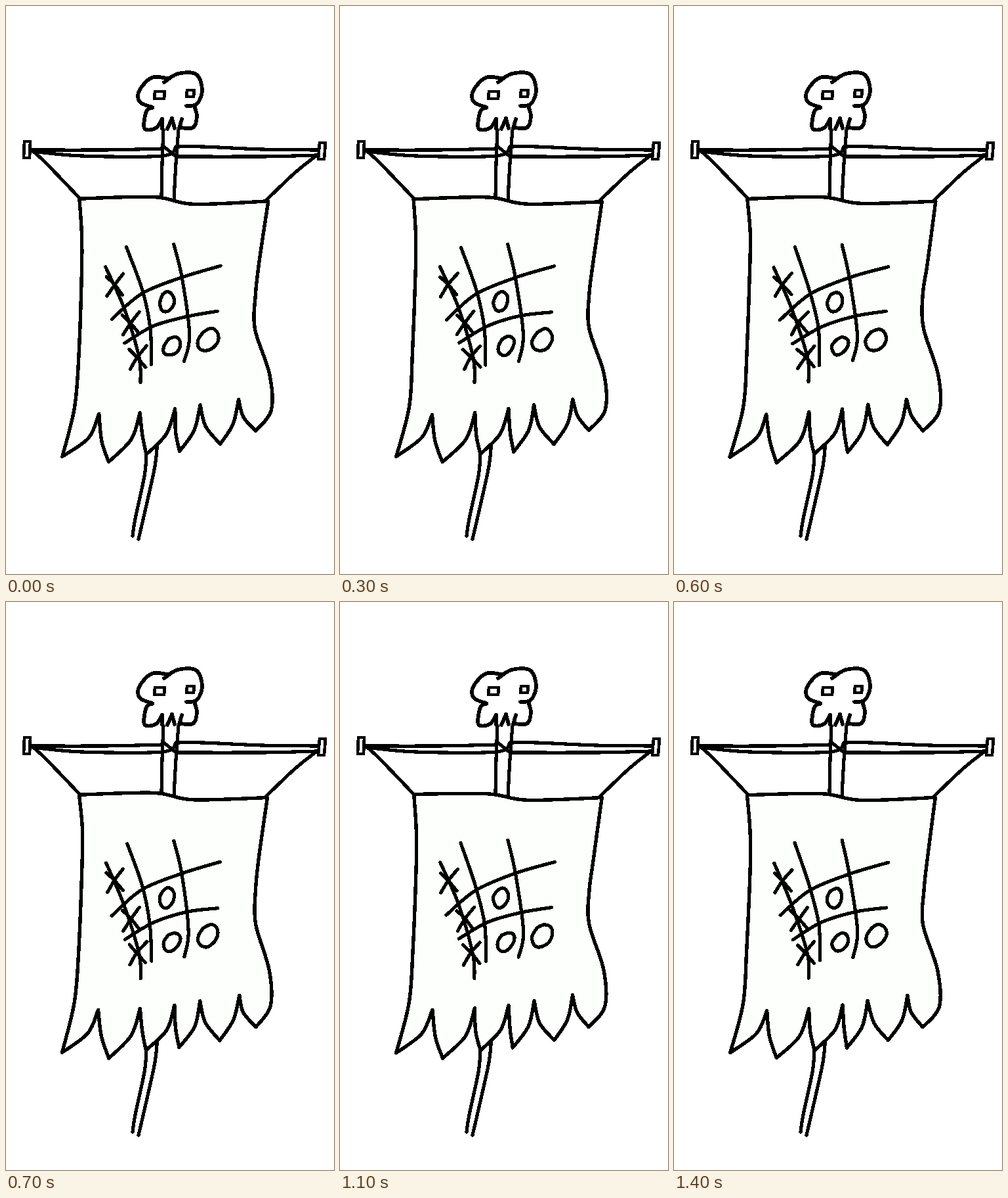
Write an HTML page that moves like this. It is 500 px wide and 864 px high and loops after 1500 ms.

```html
<!DOCTYPE html>
<html lang="en">
<head>
<meta charset="utf-8">
<title>Tattered banner</title>
<style>
  html, body { margin: 0; width: 100%; height: 100%; overflow: hidden; background: #fff; }
  svg { display: block; width: 100vw; height: 100vh; }
  path { fill: none; stroke: #000; stroke-linecap: round; stroke-linejoin: round; shape-rendering: crispEdges; }
</style>
</head>
<body>
<svg id="stage" viewBox="0 0 500 864"></svg>
<script>
const STEP = 100, STEPS = 15, WOBBLE = 0.9;
const stage = document.getElementById('stage');

// A curve is a list of points it passes through.
const curve = text => text.split(' ').map(p => p.split(',').map(Number));
const curves = (...texts) => texts.map(curve);

function box(x, y, w, h, lean) {
  const c = [[x + lean, y], [x + w + lean, y], [x + w, y + h], [x, y + h]];
  return c.map((p, i) => [p, c[(i + 1) % 4]]);
}

function ring(x, y, rx, ry, lean) {
  return Array.from({ length: 9 }, (_, i) => {
    const a = (i % 8 - 3) * Math.PI / 4;
    return [x + rx * Math.cos(a) - lean * Math.sin(a), y + ry * Math.sin(a)];
  });
}

const cross = (x, y) => [
  [[x + 14, y - 17], [x, y], [x - 11, y + 18]],
  [[x - 12, y - 12], [x, y], [x + 13, y + 15]]
];

// Each side of a tooth drops steeply from the notch, then swings to the tip.
const side = ([nx, ny], [tx, ty]) =>
  [[nx, ny], [nx + 0.28 * (tx - nx), ny + 0.55 * (ty - ny)], [tx, ty]];

function hem(tips, notches) {
  return notches.flatMap((n, i) => [side(n, tips[i]).reverse(), side(n, tips[i + 1])]);
}

const skull = curves(
  '241,116 262,103 290,104 299,128 291,149 275,152',
  '246,110 222,109 203,129 204,146 223,154',
  '223,155 214,160 211,186 228,186 238,172',
  '287,152 291,168 285,185 266,185',
  '238,172 238,186', '253,171 246,187', '253,171 257,186', '268,172 264,186'
);
const boxes = [box(226, 130, 15, 11, 1), box(275, 128, 11, 10, 1),
  box(27, 206, 9, 25, 1), box(476, 208, 9, 25, 2)].flat();
const pole = curves(
  '40,219 150,219 239,217', '40,221 115,228 238,228 259,214', '242,215 259,229',
  '259,214 300,214 390,218 474,219', '259,229 390,229 474,227',
  '39,219 60,238 112,292', '474,227 440,254 395,297',
  '240,188 238,240 237,292', '263,188 259,240 256,295',
  '214,682 211,715 197,780 193,806', '231,662 227,700 215,755 202,811'
);
const cloth = [
  curve('112,293 225,291 285,301 399,297'),
  curve('399,297 386,390 380,440 380,490 402,560 404,615 380,646'),
  ...hem(curve('380,646 326,667 264,678 214,682 157,694 85,686'),
         curve('355,598 296,607 257,613 205,618 141,621')),
  curve('85,686 105,610 111,530 116,400 116,345 112,293')
];
const game = [
  ...curves(
    '184,367 207,432 220,490 222,546', '256,363 268,414 279,500 272,540',
    '162,477 207,438 268,413 327,396', '181,513 225,487 275,472 323,465',
    '152,397 180,460 203,535 205,572'),
  ...cross(165, 424), ...cross(190, 482), ...cross(200, 534),
  ring(245, 450, 11, 15, 2), ring(253, 517, 12, 14, 4), ring(308, 508, 15, 17, 4)
];

// Signed noise in -1..1; a shared corner always moves as one point.
function noise(x, y, k) {
  const n = Math.sin(Math.round(x) * 12.9898 + Math.round(y) * 78.233 + k * 37.719) * 43758.5453;
  return (n - Math.floor(n)) * 2 - 1;
}

function spline(points) {
  const at = i => points[Math.max(0, Math.min(points.length - 1, i))];
  return points.slice(1).map((c, i) => {
    const [a, b, e] = [at(i - 1), at(i), at(i + 2)];
    const c1 = b.map((v, n) => v + (c[n] - a[n]) / 6);
    const c2 = c.map((v, n) => v - (e[n] - b[n]) / 6);
    return `C${[...c1, ...c2, ...c].map(v => v.toFixed(2)).join(' ')}`;
  }).join('');
}

function outline(list, step, amount) {
  const move = ([x, y]) => [x + amount * noise(x, y, step), y + amount * noise(y, x, step + 50)];
  let d = '', last = '';
  for (const points of list) {
    if (String(points[0]) !== last) d += `M${move(points[0]).join(' ')}`;
    d += spline(points.map(move));
    last = String(points[points.length - 1]);
  }
  return d;
}

function draw(list, width, fill = 'none') {
  const path = document.createElementNS('http://www.w3.org/2000/svg', 'path');
  path.setAttribute('stroke-width', width);
  path.setAttribute('d', outline(list, 0, 0));
  path.style.fill = fill;
  stage.append(path);
  return { path, list };
}

draw(skull, 5.8);
draw(boxes, 4.6);
draw(pole, 5.2);
const moving = [draw(cloth, 5.4, '#fdfffc'), draw(game, 5.2)];

let shown = -1;
function tick(now) {
  const step = Math.floor(now / STEP) % STEPS;
  if (step !== shown) {
    shown = step;
    for (const { path, list } of moving) path.setAttribute('d', outline(list, step, WOBBLE));
  }
  requestAnimationFrame(tick);
}
tick(performance.now());
</script>
</body>
</html>
```
